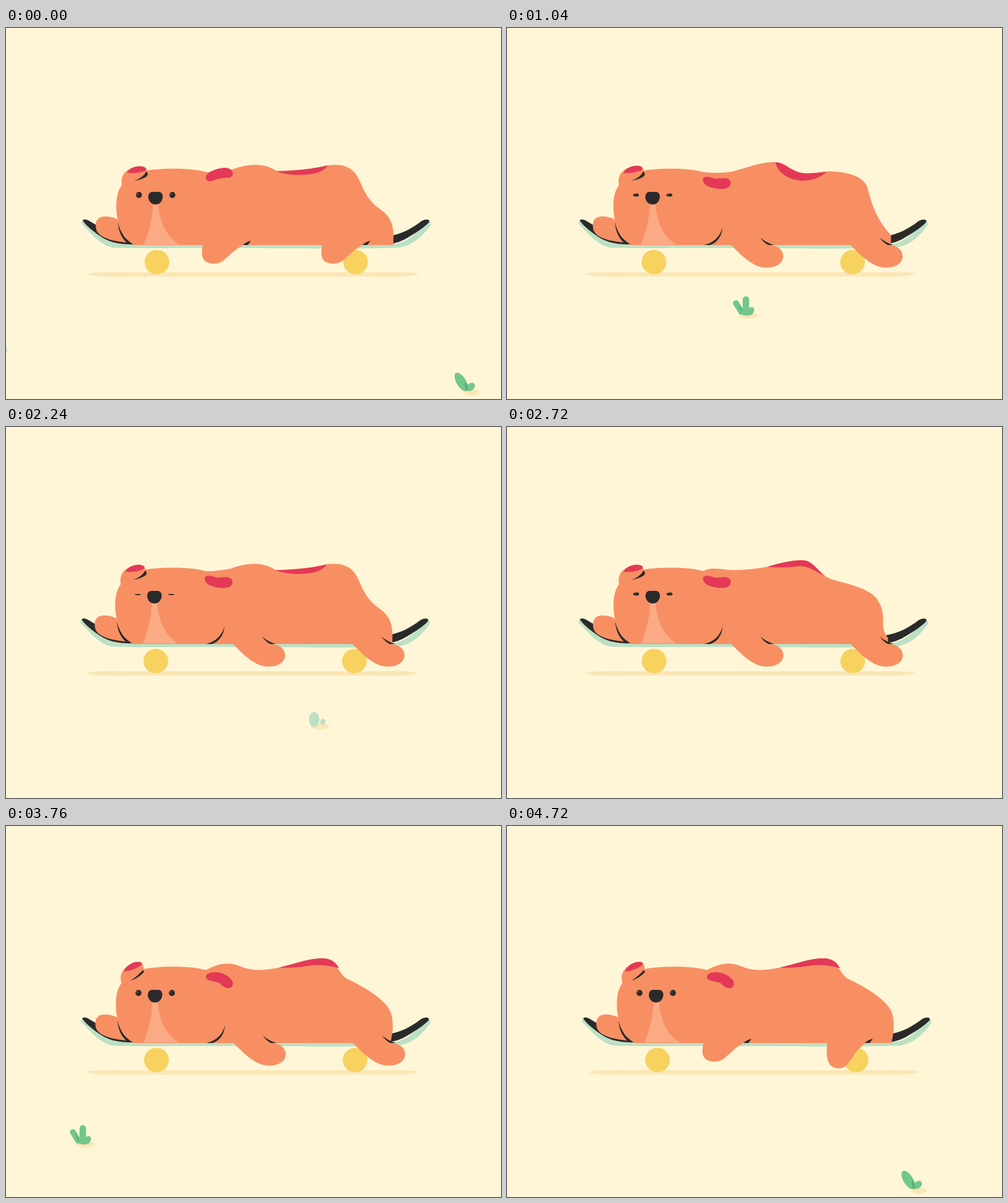
An HTML page with a canvas that plays this animation: 800x600 px, repeating every 4760 ms.

```html
<!DOCTYPE html>
<html lang="en">
<head>
<meta charset="utf-8">
<title>Skateboard nap</title>
<style>
html, body { margin: 0; width: 100%; height: 100%; overflow: hidden; background: #fff6d7; }
canvas { display: block; }
</style>
</head>
<body>
<canvas id="stage" width="800" height="600"></canvas>
<script>
const ctx = document.getElementById('stage').getContext('2d');
const LOOP = 4760, WORLD = 4800, CYCLE = 1600, SPEED = 1.0917;
const SKY = '#fff6d7', ORANGE = '#f78f63', PINK = '#e33957', DARK = '#2b2a2a', SAND = '#fbe6b5',
  PALE = '#bce0c4', GREEN = '#73c78c', MOSS = '#58b078', YELLOW = '#f7d25f', CHEST = '#fbaa86';

function fill(d, color) {
  ctx.fillStyle = color;
  ctx.fill(new Path2D(d));
}
function oval(x, y, rx, ry, color, deg = 0) {
  ctx.fillStyle = color;
  ctx.beginPath();
  ctx.ellipse(x, y, rx, ry, deg * Math.PI / 180, 0, 7);
  ctx.fill();
}
function at(x, y, draw, deg = 0) {
  ctx.save();
  ctx.translate(x, y);
  ctx.rotate(deg * Math.PI / 180);
  draw();
  ctx.restore();
}
function limb(x1, y1, x2, y2, width) {
  ctx.strokeStyle = GREEN;
  ctx.lineWidth = width;
  ctx.lineCap = 'round';
  ctx.beginPath();
  ctx.moveTo(x1, y1);
  ctx.lineTo(x2, y2);
  ctx.stroke();
}
// keys: [time, value] pairs, value is an array of numbers
function tween(keys, t) {
  let i = 1;
  while (i < keys.length - 1 && keys[i][0] <= t) i++;
  const [t0, a] = keys[i - 1], [t1, b] = keys[i];
  const k = Math.min(1, Math.max(0, (t - t0) / (t1 - t0)));
  return a.map((v, n) => v + (b[n] - v) * k);
}

// Scenery, each drawn from its left edge and base
function sprout() {
  oval(28, -5.5, 12, 5, SAND);
  oval(26, -14.5, 8, 5.7, GREEN, -40);
  oval(11, -22.5, 7.8, 16.8, GREEN, -31);
  oval(19, -15, 2.2, 7, MOSS, -12);
}
function cactus() {
  oval(25, -5, 15, 5, SAND);
  limb(5.5, -25, 14, -11, 9.5);
  limb(21.5, -31, 21.5, -11, 10.5);
  oval(30, -13, 4.6, 6, GREEN, 25);
  oval(23, -9, 10, 4, GREEN);
  fill('M10 -21Q15 -17 16 -10Q11 -14 10 -21Z', MOSS);
}
function shrub() {
  oval(18, -6, 15, 5, SAND);
  oval(9, -17, 8.5, 12, PALE);
  oval(23, -13, 4.2, 5, PALE);
}
function rock() {
  oval(10.5, -4, 10.5, 4, SAND);
  fill('M0 -5Q3 -17 13 -18Q22 -15 20 -5Q10 -2 0 -5Z', PALE);
  oval(8, -12, 1.2, 1.2, '#7fa58c');
}
// [draw, time at which the left edge meets x = 0, base y]
const scenery = [
  [rock, 17, 528], [cactus, 706, 470], [sprout, 1300, 592], [shrub, 1792, 490],
  [rock, 2980, 458], [cactus, 3666, 520], [sprout, 4136, 595]
];

// Body: four back shapes, each with the outline and its patch
const backs = [
  ['Q340 234 365 229C390 220 415 217 437 231Q490 230 520 222C555 218 565 232 573 250C585 280 597 287 610 297C625 310 628 325 626 351',
   'M437 232Q490 230 520 222Q515 232 495 236Q465 241 437 232Z'],
  ['Q350 236 371 232C400 224 420 216 440 217C460 218 467 236 492 235C505 235 520 231 532 232C566 234 584 243 589 258C597 290 606 312 627 335V351',
   'M440 217C460 218 467 236 492 235Q507 235 523 233Q507 247 482 247Q447 243 440 217Z'],
  ['C335 226 350 230 365 231Q390 233 427 226C450 220 470 214 487 216C505 218 508 238 530 246C560 255 590 260 604 278C616 295 614 310 614 322Q616 335 622 341V351',
   'M427 226C450 220 470 214 487 216C500 217 508 232 521 241C500 232 495 225 478 225Q455 229 427 226Z'],
  ['C345 222 360 219 380 227C400 236 420 233 442 229C470 222 495 213 512 214C534 215 537 236 550 246C572 257 613 277 623 302C628 320 626 335 622 351',
   'M442 229C470 222 495 213 512 214C528 214 535 222 539 230Q515 223 490 226Q465 230 442 229Z']
];
const spots = [
  'M323 243C322 232 345 226 354 226C370 227 370 241 360 242C345 242 335 247 330 248Q324 248 323 243Z',
  'M323 246C323 238 333 240 343 244C352 243 367 240 368 250C368 260 357 261 347 260C332 258 324 254 323 246Z',
  'M324 243C326 235 345 235 354 240C366 246 370 254 366 260C360 265 352 261 346 254C335 250 323 251 324 243Z'
];
const lowFold = 'M207 247Q221 243 227 232Q232 237 226 241Q217 246 207 247Z';
const highFold = 'M202 250Q211 245 222 233L224 236Q214 247 202 250Z';
// [tilt, fold]
const ears = [[0, lowFold], [-3, lowFold], [-15, highFold]];

// Leg poses: start, then two cubic curves through the paw
const ready = [319, 348, 313, 372, 319, 381, 337, 381, 355, 382, 360, 360, 395, 345];
const reach = [335, 348, 322, 368, 302, 399, 336, 399, 362, 399, 364, 380, 399, 341];
const push = [352, 348, 358, 370, 352, 397, 375, 397, 398, 397, 400, 375, 415, 345];
const trail = [366, 348, 385, 368, 404, 387, 425, 387.5, 462, 388, 460, 353, 432, 351];
const land = [326, 345, 323, 372, 324, 391, 343, 392, 366, 392, 362, 362, 398, 345];
const stride = [
  [0, ready], [190, ready], [240, reach], [360, push], [480, trail], [1200, trail],
  [1350, push], [1440, land], [1520, ready], [1600, ready]
];
const lids = [
  [0, [5]], [880, [5]], [1040, [2.6]], [1440, [2.6]], [1600, [0.9]],
  [2320, [0.9]], [2480, [2.6]], [3520, [2.6]], [3680, [5]]
];

function leg(phase, x, front) {
  const p = tween(stride, (phase + CYCLE) % CYCLE);
  at(x, 0, () => {
    fill(`M${p.slice(0, 2)}C${p.slice(2, 8)}C${p.slice(8)}Z`, ORANGE);
    if (phase >= 420 && phase < 1300) {
      fill('M416 339Q425 347 438 351H429Q421 347 416 339Z', DARK);
      if (front) fill('M325 351Q349 345 355 322Q353 344 335 351Z', DARK);
    } else {
      at(p[12], p[13], () => fill('M-12 6Q-7 1 1 -1L-4 6Z', DARK));
    }
  });
}
function board() {
  fill('M133 398Q135 394 200 395H600Q665 394 666 398Q660 403 600 402H200Q135 403 133 398Z', SAND);
  oval(244, 378.5, 20, 19.7, YELLOW);
  oval(565, 378.5, 20, 19.7, YELLOW);
  fill('M122 316C140 335 152 350 172 355C185 357 300 355 400 356S600 357 636 355C660 351 675 335 687 318Q687 312 682 311C660 335 650 345 630 349H180C160 345 145 325 128 310Q122 310 122 316Z', PALE);
  fill('M124 311Q127 308 133 311L150 321L206 350C180 350 165 346 150 335Q130 321 124 311Z', DARK);
  fill('M684 311Q680 308 672 312C655 325 640 333 618 337V350Q638 347 651 338Q675 324 684 314Z', DARK);
}
function ear([tilt, fold]) {
  at(200, 250, () => {
    ctx.translate(-200, -250);
    fill('M188 258C184 240 192 232 200 228Q220 220 227 227Q230 238 224 242L207 256Z', ORANGE);
    fill('M196 234C200 224 218 221 225 226Q228 229 225 231Q212 236 196 234Z', PINK);
  }, tilt);
  fill(fold, DARK);
}
function face(lid) {
  fill('M238 284H246Q250 332 280 350H223Q236 320 238 284Z', CHEST);
  fill('M236 265H248Q254 267 253.5 274C252 282 247 285.5 242 285.5C236 285.5 231 281 230 274Q230 266 236 265Z', DARK);
  for (const x of [215, 269]) {
    oval(x, lid < 1 ? 271 : 270, 4.8, lid, DARK);
    if (lid > 2) oval(x - 2, 268.5, 1.1, 1.1, '#a3705a');
  }
}
function dog(t, phase) {
  const beat = Math.floor(t / 80);
  const [outline, patch] = backs[beat % 4];
  fill('M146 326C141 303 160 301 180 309L195 347C175 345 150 340 146 326Z', ORANGE);
  fill(`M206 351Q183 335 179 300C177 275 181 262 189 252Q205 232 225 231C250 226 300 226 324 233${outline}Z`, ORANGE);
  fill(patch, PINK);
  fill(spots[beat % 3], PINK);
  fill('M181 314Q186 338 206 350L196 348Q182 335 181 314Z', DARK);
  face(tween(lids, t)[0]);
  ear(ears[beat % 3]);
  leg(phase, 0, true);
  leg(phase - 80, 193, false);
}

function render(now) {
  const clock = now % LOOP, beat = clock % CYCLE;
  // Drawn on twos, except on ones during the push
  const step = beat >= 320 && beat < 480 ? 40 : 80;
  const t = Math.floor(clock / step) * step, phase = t % CYCLE;

  ctx.fillStyle = SKY;
  ctx.fillRect(0, 0, 800, 600);
  for (const [draw, enter, base] of scenery) {
    for (const wrap of [0, WORLD]) {
      const x = (t + wrap - enter) * SPEED;
      if (x > -60 && x < 800) at(x, base, draw);
    }
  }
  const swing = (1 - Math.cos((phase - 240) / CYCLE * 2 * Math.PI)) / 2;
  at(0.4 - 6.9 * swing ** 1.6, 0, () => {
    board();
    dog(t, phase);
  });
  requestAnimationFrame(render);
}
requestAnimationFrame(render);
</script>
</body>
</html>
```
